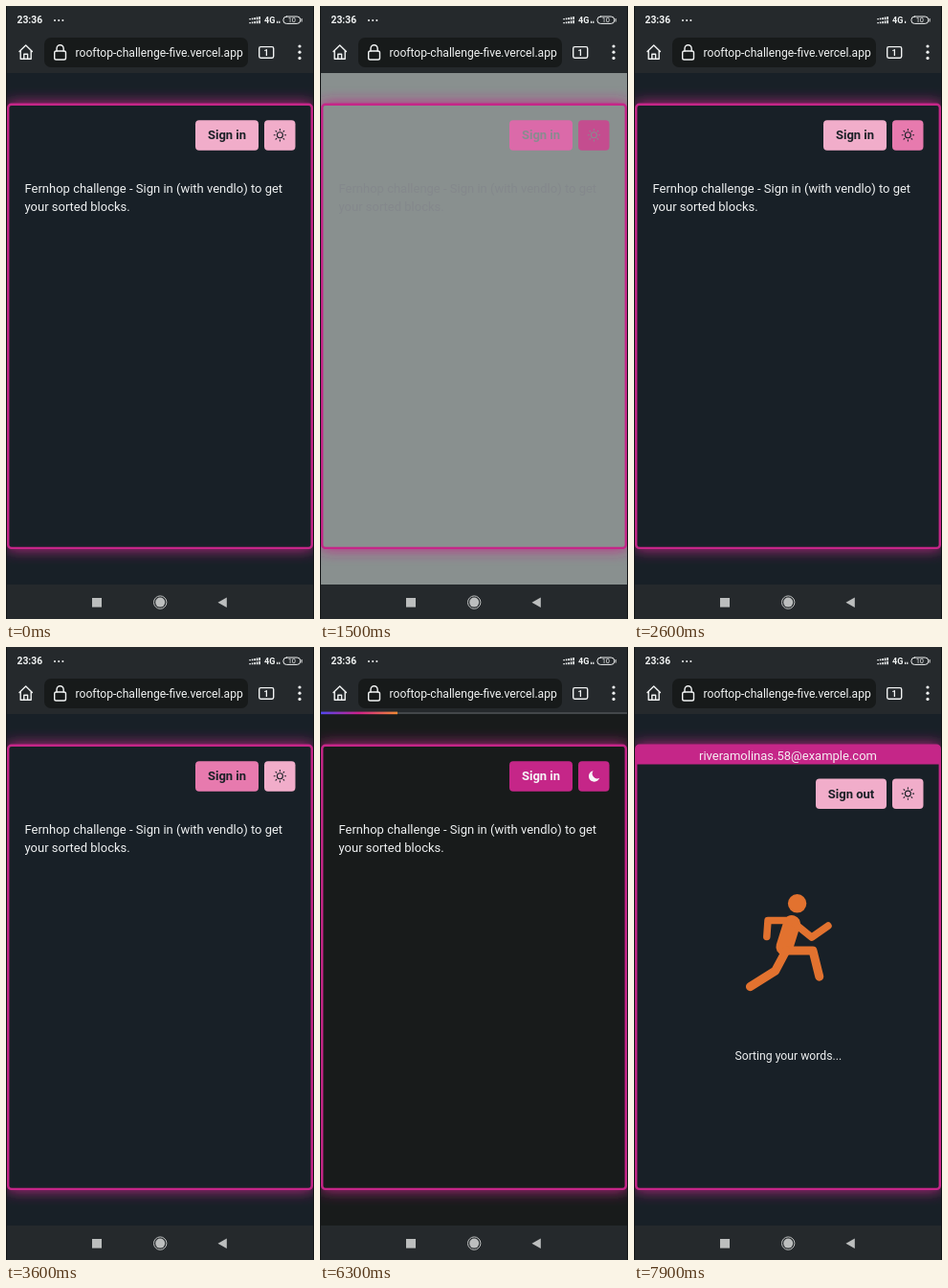
An HTML page that plays this animation: 322 px wide and 640 px high, repeating every 8 s.

```html
<!DOCTYPE html>
<html lang="en">
<head>
<meta charset="utf-8">
<title>Sorted blocks</title>
<style>
  html, body { margin: 0; width: 100%; height: 100%; overflow: hidden; background: #182027; }
  svg { display: block; width: 322px; height: 640px; font-family: Roboto, Arial, sans-serif; }
  .bar { fill: #25292c; }
  .page { fill: var(--page); }
  .body { fill: var(--ink); font-size: 13px; }
  .label { fill: var(--label); font-size: 13px; font-weight: 700; text-anchor: middle; }
  .sign { fill: var(--sign); }
  .theme { fill: var(--theme); }
  .pink { fill: #c52688; }
  .line { fill: none; stroke: #f1f3f3; stroke-width: 1.4; stroke-linejoin: round; stroke-linecap: round; }
  .white { fill: #f1f3f3; }
  .nav { fill: #bcbebe; }
  .limb { fill: none; stroke: #e2722f; stroke-linejoin: round; stroke-linecap: round; }
</style>
</head>
<body>
<svg id="stage" viewBox="0 0 322 640">
  <defs>
    <filter id="blur" x="-20%" y="-20%" width="140%" height="140%"><feGaussianBlur stdDeviation="7.5"/></filter>
    <linearGradient id="load">
      <stop offset="0" stop-color="#5146ee"/>
      <stop offset=".5" stop-color="#cf2189"/>
      <stop offset="1" stop-color="#f28b34"/>
    </linearGradient>
  </defs>

  <rect class="page" width="322" height="640"/>
  <rect class="pink" x="1" y="102" width="320" height="465" rx="4" filter="url(#blur)"/>
  <rect class="page" x="2.2" y="102.7" width="317.6" height="463.2" rx="3.5" stroke="#c52688" stroke-width="2.4"/>

  <g id="account">
    <rect class="pink" x="2" y="103" width="318" height="19.5"/>
    <text x="161" y="118" text-anchor="middle" font-size="13" fill="#f6eef3">riveramolinas.58@example.com</text>
  </g>

  <g id="buttons">
    <rect id="signBox" class="sign" y="119.3" height="31.4" rx="4"/>
    <text id="signText" class="label" y="139.4"></text>
    <rect class="theme" x="270" y="119.3" width="32.5" height="31.4" rx="4"/>
    <g id="sun" transform="translate(286.4 134.8)" fill="none" stroke="var(--label)" stroke-linecap="round">
      <circle r="3" stroke-width="1.1"/>
      <path id="rays" stroke-width="1.1"/>
    </g>
    <path id="moon" transform="translate(286.4 134.8)" fill="var(--label)"
      d="M-.8-5.6A5.8 5.8 0 1 0 5.8 2A5.2 5.2 0 0 1-.8-5.6Z"/>
  </g>

  <g id="intro" class="body">
    <text x="19.5" y="195.3">Fernhop challenge - Sign in (with vendlo) to get</text>
    <text x="19.5" y="213.8">your sorted blocks.</text>
  </g>

  <g id="sorting">
    <circle cx="170.6" cy="267.8" r="9.7" fill="#e2722f"/>
    <path class="limb" stroke-width="18" d="M165 289L157.5 313"/>
    <path class="limb arm" stroke-width="7.5"/>
    <path class="limb arm" stroke-width="7.5"/>
    <path class="limb leg" stroke-width="9"/>
    <path class="limb leg" stroke-width="9"/>
    <text x="161.3" y="430.6" text-anchor="middle" font-size="12.2" fill="#eef0f1">Sorting your words...</text>
  </g>

  <!-- phone and browser chrome -->
  <rect class="bar" width="322" height="70"/>
  <g id="loader">
    <rect x="1" y="68" width="320" height="2" fill="#43474a"/>
    <rect id="loaded" x="1" y="67.6" height="2.6" fill="url(#load)"/>
  </g>
  <text class="white" x="11.5" y="18.2" font-size="10.3" font-weight="700">23:36</text>
  <g class="white">
    <circle cx="51" cy="15" r="1"/><circle cx="55.2" cy="15" r="1"/><circle cx="59.4" cy="15" r="1"/>
  </g>
  <path id="signal" class="white"/>
  <text class="white" x="270" y="18.2" font-size="9" font-weight="700">4G</text>
  <path class="white" d="M283 15.8h1.2v2.3h-1.2z"/>
  <path id="data" class="white" d="M285.2 15.8h1.2v2.3h-1.2z"/>
  <rect class="line" x="289.9" y="11" width="17.8" height="7.4" rx="3.4" style="stroke-width:1"/>
  <path class="white" d="M308.6 13h1v3.4h-1z"/>
  <text class="white" x="298.8" y="17.4" font-size="7.4" text-anchor="middle">10</text>

  <path class="line" d="M14 47.5L20.7 41L27.4 47.5M15.2 46.6V55.2H26.2V46.6M18.8 55V50.2H22.6V55"/>
  <rect x="40" y="33" width="213" height="31" rx="7" fill="#171a1a"/>
  <rect class="line" x="50.7" y="47" width="11.8" height="9" rx="1.8"/>
  <path class="line" d="M53 47V44.4a3.6 3.6 0 0 1 7.2 0V47"/>
  <text class="white" x="72.5" y="52.6" font-size="12.1">rooftop-challenge-five.vercel.app</text>
  <rect class="line" x="264.7" y="42.6" width="15" height="11.6" rx="1.6"/>
  <text class="white" x="272.2" y="51.8" font-size="9" font-weight="700" text-anchor="middle">1</text>
  <g class="white">
    <circle cx="307" cy="42" r="1.6"/><circle cx="307" cy="48.2" r="1.6"/><circle cx="307" cy="54.4" r="1.6"/>
  </g>

  <rect class="bar" y="604" width="322" height="36"/>
  <rect class="nav" x="90" y="618" width="10" height="9.6"/>
  <circle class="nav" cx="161.2" cy="622.6" r="5"/>
  <circle cx="161.2" cy="622.6" r="6.7" fill="none" stroke="#bcbebe"/>
  <path class="nav" d="M221.5 622.7L230.8 617.4V628Z"/>
  <path d="M0 0h1v640h-1zM321 0h1v640h-1z" fill="#111415"/>
</svg>

<script>
const LOOP = 8000, STEP = 100, STRIDE = 640;
const $ = id => document.getElementById(id);
const show = (id, on) => { $(id).style.display = on ? "" : "none"; };

const PALE = [241, 173, 202], ROSE = [231, 122, 174], MAGENTA = [197, 38, 136], PLUM = [160, 32, 112];
const INK = [26, 32, 38], WHITE = [246, 247, 247];
const DARK = { page: [24, 32, 39], ink: [238, 240, 241], label: INK, sign: PALE, theme: PALE };
const looks = {
  dark: DARK,
  light: { page: [250, 255, 247], ink: INK, label: WHITE, sign: MAGENTA, theme: PLUM },
  themeHover: { ...DARK, theme: ROSE },
  signHover: { ...DARK, sign: ROSE },
  reload: { page: [24, 27, 27], ink: [238, 240, 241], label: WHITE, sign: MAGENTA, theme: MAGENTA }
};

// start, duration, look reached, icon shown
const changes = [
  [0, 0, "dark", "sun"],
  [300, 300, "light", "moon"],
  [1400, 200, "themeHover", "sun"],
  [2900, 500, "signHover", "sun"],
  [6300, 0, "reload", "moon"],
  [6301, 299, "dark", "sun"]
];

// time and width of the loading bar
const loading = [[4600, 42], [4700, 80], [6400, 160], [6500, 250], [6600, 320], [6800, 0]];

// [upper angle, upper length, lower angle, lower length], degrees from straight down
const legKeys = [[50, 25, -88, 30], [90, 28, 14, 28], [5, 23, 4, 24], [-28, 24, -58, 31]];
const armKeys = [[-45, 22, 60, 24], [51, 28, 125, 21], [-45, 22, 60, 24], [-90, 24, -4, 17]];

const mix = (a, b, k) => a + (b - a) * k;
const smooth = k => k * k * (3 - 2 * k);

function limb(el, x, y, keys, phase) {
  const p = ((phase % 1) + 1) % 1 * 4, i = Math.floor(p), k = smooth(p - i);
  const [a, m, b, n] = keys[i].map((v, j) => mix(v, keys[(i + 1) % 4][j], k));
  let d = `M${x} ${y}`;
  for (const [angle, size] of [[a, m], [b, n]]) {
    x += Math.sin(angle * Math.PI / 180) * size;
    y += Math.cos(angle * Math.PI / 180) * size;
    d += `L${x.toFixed(2)} ${y.toFixed(2)}`;
  }
  el.setAttribute("d", d);
}

function paint(t) {
  const i = changes.findLastIndex(c => t > c[0] || (t === c[0] && !c[1]));
  const [start, span, look, icon] = changes[i];
  const to = looks[look], from = i ? looks[changes[i - 1][2]] : to;
  const k = span ? smooth(Math.min(1, (t - start) / span)) : 1;
  for (const part in to) {
    const rgb = to[part].map((v, j) => Math.round(mix(from[part][j], v, k)));
    $("stage").style.setProperty("--" + part, `rgb(${rgb})`);
  }
  show("sun", icon === "sun");
  show("moon", icon === "moon");

  const signedIn = t >= 6800;
  show("account", signedIn);
  show("sorting", signedIn);
  show("intro", !signedIn);
  $("buttons").setAttribute("transform", `translate(0 ${signedIn ? 18.3 : 0})`);
  $("signBox").setAttribute("x", signedIn ? 190 : 198);
  $("signBox").setAttribute("width", signedIn ? 74 : 66);
  $("signText").setAttribute("x", signedIn ? 227 : 231);
  $("signText").textContent = signedIn ? "Sign out" : "Sign in";

  const bar = loading.findLast(s => t >= s[0]);
  show("loader", bar && bar[1]);
  $("loaded").setAttribute("width", bar ? bar[1] : 0);
  show("data", t < 2600 || t >= 3600);

  const phase = (t - 7100) / STRIDE;
  document.querySelectorAll(".leg").forEach((el, j) => limb(el, 159, 317, legKeys, phase + j / 2));
  document.querySelectorAll(".arm").forEach((el, j) => limb(el, 164, 285.5, armKeys, phase + j / 2));
}

let rays = "", signal = "";
for (let j = 0; j < 8; j++) {
  const x = Math.cos(j * Math.PI / 4), y = Math.sin(j * Math.PI / 4);
  rays += `M${x * 5.1} ${y * 5.1}L${x * 6.2} ${y * 6.2}`;
}
// two rows of rising bars, one for each SIM card
for (const base of [14.2, 18.2])
  for (let c = 0; c < 5; c++) signal += `M${254.3 + c * 2.5} ${base}h1.6v${-1.2 - c * 0.5}h-1.6z`;
$("rays").setAttribute("d", rays);
$("signal").setAttribute("d", signal);

const born = performance.now();
function tick() {
  const t = (performance.now() - born) % LOOP;
  paint(Math.floor(t / STEP) * STEP);
  requestAnimationFrame(tick);
}
tick();
</script>
</body>
</html>
```
